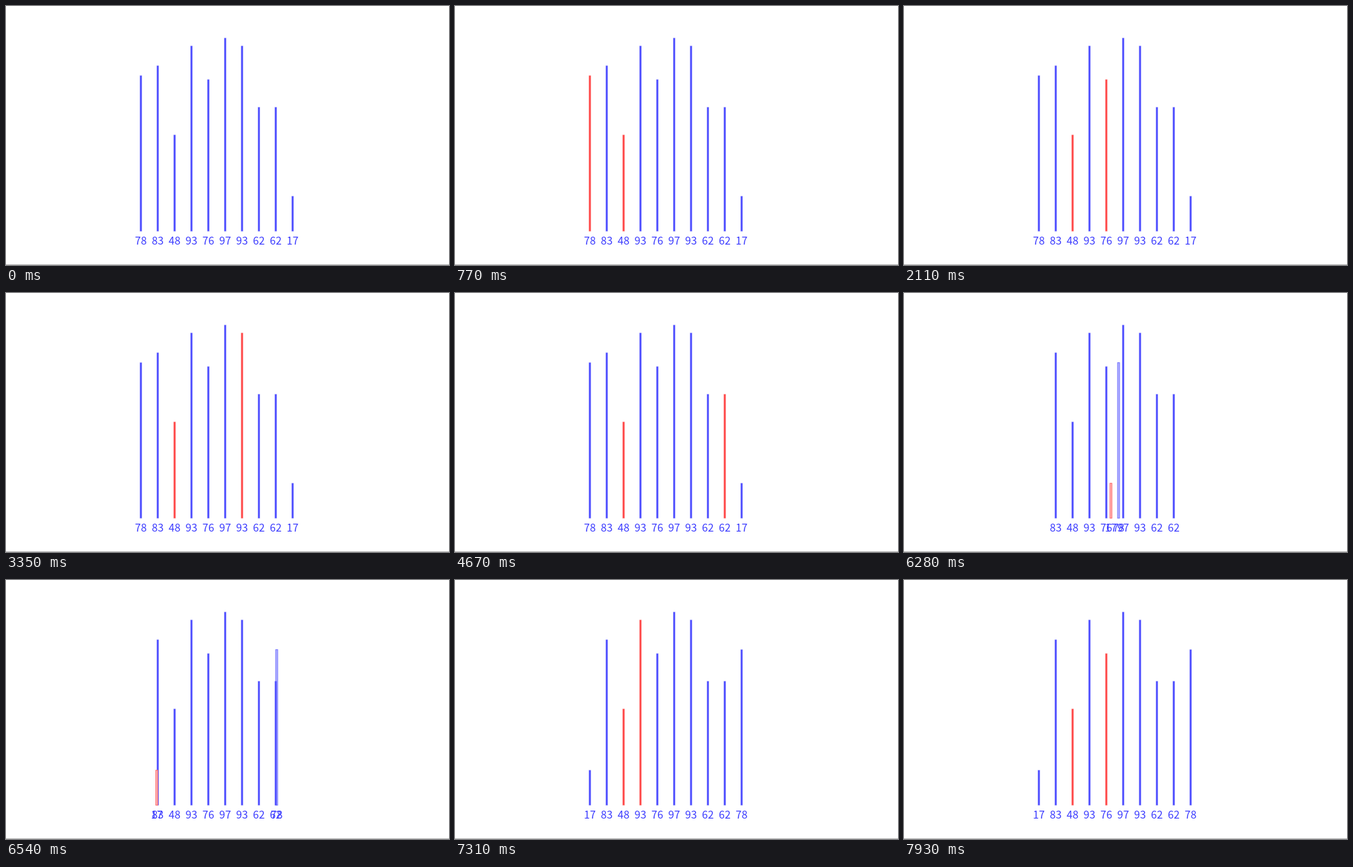
Write an HTML page that moves like this. It is 670 px wide and 393 px high and loops after 8000 ms.

```html
<!DOCTYPE html>
<html lang="en">
<head>
<meta charset="utf-8">
<title>Selection sort</title>
<style>
  html, body { margin: 0; width: 100%; height: 100%; overflow: hidden; background: #fff; }
  svg { display: block; width: 670px; height: 393px; }
  text {
    font: 16px "Noto Sans CJK SC", "Noto Sans CJK JP", "Open Sans", sans-serif;
    text-anchor: middle;
    fill: #3c3cff;
  }
  .bar { fill: #4c4cff; stroke: #4c4cff; stroke-opacity: .3; }
  .bar.marked { fill: #ff4848; stroke: #ff4848; }
  .bar.moving { fill: #b4b4ff; stroke: #7070ff; stroke-opacity: 1; }
  .bar.moving.marked { fill: #ffb4b4; stroke: #ff6c6c; }
</style>
</head>
<body>
<svg id="stage" viewBox="0 0 670 393">
  <rect y="392" width="670" height="1" fill="#b0b0b0"/>
</svg>
<script>
const VALUES = [78, 83, 48, 93, 76, 97, 93, 62, 62, 17];
const LOOP = 8000;
const LEAD = 140;           // pause before the first comparison
const TICK = 69.4;          // display refresh
const STEP_TICKS = 9.41;    // refreshes per sorting step
const SWAP_TICK = 79;       // refresh while bars move
const BASE = 342;

const stage = document.getElementById('stage');
const slotX = i => 204 + 25.5 * i;

function set(el, attrs) {
  for (const key in attrs) el.setAttribute(key, attrs[key]);
}

function add(name, attrs) {
  const el = document.createElementNS('http://www.w3.org/2000/svg', name);
  set(el, attrs);
  return stage.appendChild(el);
}

// Each step holds the bar in every slot, the marked slots and any swap.
function sortSteps(values) {
  const order = values.map((_, i) => i);
  const steps = [];
  const push = (marks, swap) => steps.push({ order: [...order], marks, swap });
  for (let i = 0; i < order.length - 1; i++) {
    let min = i;
    for (let j = i + 1; j < order.length; j++) {
      push([min, j]);
      if (values[order[j]] < values[order[min]]) min = j;
    }
    if (min !== i) {
      push([min], [i, min]);
      [order[i], order[min]] = [order[min], order[i]];
    }
  }
  return steps;
}

const steps = sortSteps(VALUES);
const idle = { order: VALUES.map((_, i) => i), marks: [] };

const bars = VALUES.map(v => {
  const top = 340 - 3 * v;
  const rect = add('rect', { y: top - 0.3, height: BASE - top });
  const label = add('text', { y: 362 });
  label.textContent = v;
  return { rect, label };
});

function place(bar, x, marked, moving) {
  const half = moving ? 1.5 : 1.3;
  set(bar.rect, {
    x: x - half,
    width: 2 * half,
    class: 'bar' + (marked ? ' marked' : '') + (moving ? ' moving' : '')
  });
  bar.label.setAttribute('x', x);
}

const stepAt = t => Math.floor((Math.floor((t - LEAD) / TICK) + 1.08) / STEP_TICKS);

const stepStart = n => LEAD + TICK * Math.floor(n * STEP_TICKS - 0.08);

function swapProgress(elapsed) {
  const n = Math.floor((elapsed + 9) / SWAP_TICK);
  return n < 1 ? 0 : Math.min(1, 0.032 + 0.1233 * n);
}

function draw(t) {
  const n = stepAt(t);
  const { order, marks, swap } = steps[n] || idle;
  const p = swap ? swapProgress(t - stepStart(n)) : 0;
  order.forEach((id, slot) => {
    const swapped = swap && swap.includes(slot);
    const goal = swapped ? swap[0] + swap[1] - slot : slot;
    const x = slotX(slot + (goal - slot) * p);
    place(bars[id], x, marks.includes(slot), swapped && p > 0 && p < 1);
  });
}

const start = performance.now();
function frame() {
  draw((performance.now() - start) % LOOP);
  requestAnimationFrame(frame);
}
draw(0);
requestAnimationFrame(frame);
</script>
</body>
</html>
```
